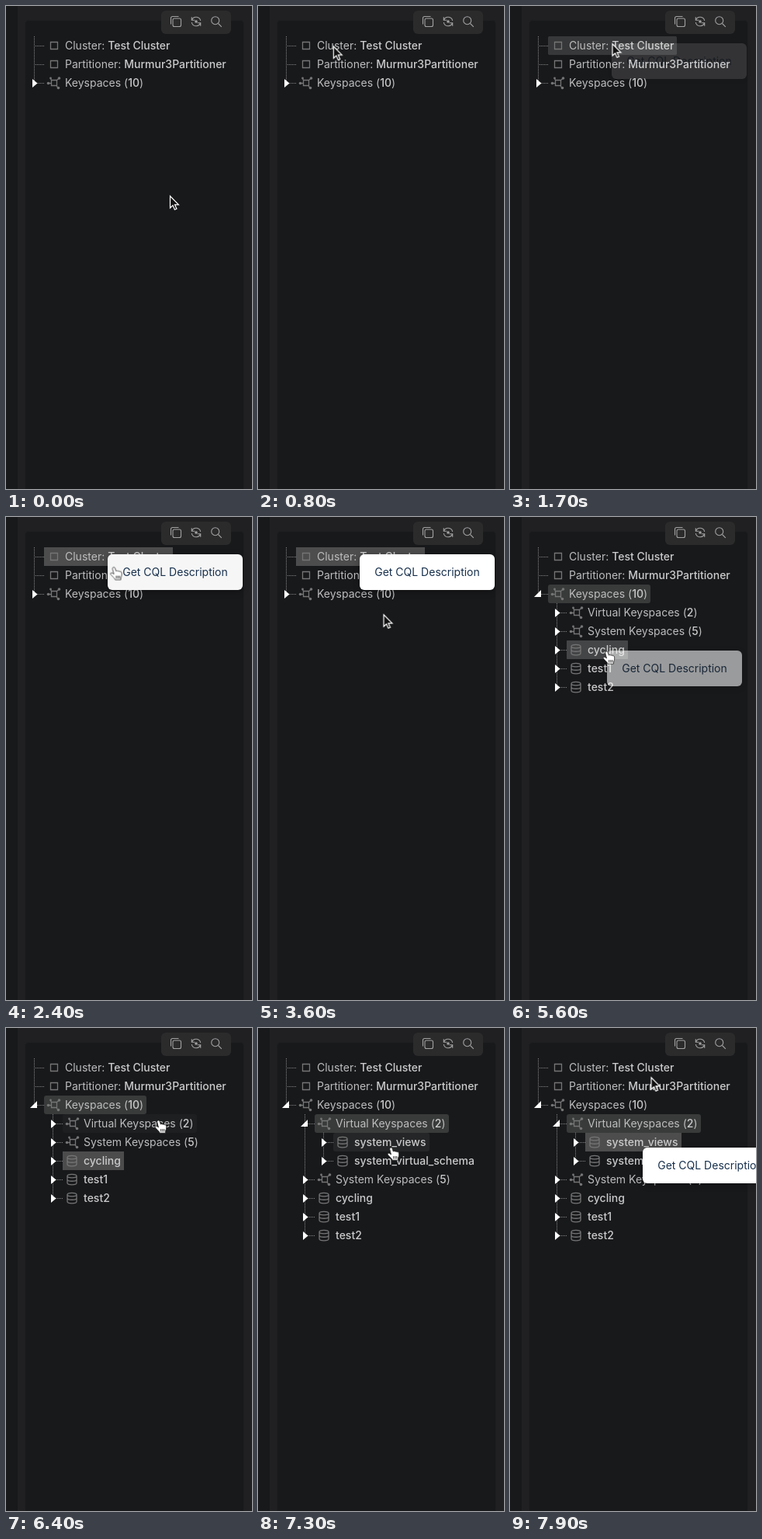
Write an HTML page that moves like this. It is 317 px wide and 622 px high and loops after 8 s.

```html
<!DOCTYPE html>
<html lang="en">
<head>
<meta charset="utf-8">
<title>Keyspace tree</title>
<style>
  :root { --hover: #252627; --picked: #393a3a; --menu: #4d4d4e; }
  * { box-sizing: border-box; }
  html, body { margin: 0; width: 100%; height: 100%; overflow: hidden; background: #202022; }
  body { position: relative; font: 14px/24px Inter, sans-serif; color: #bdbdbe; }
  svg { position: absolute; overflow: visible; fill: none; }
  b { font-weight: 500; color: #cbcbcc; }

  .rail { position: absolute; left: 0; top: 0; width: 15px; height: 100%; background: #18191b; }
  .panel { position: absolute; left: 24px; top: 18px; width: 283px; height: 640px; background: #18191b; border: 1px solid #1e1f21; border-radius: 5px; }
  .tools { position: absolute; left: 200px; top: 6px; width: 90px; height: 30px; background: #2b2b2c; border-radius: 6px; }
  .tools svg { top: 6px; width: 16px; height: 16px; stroke: #a2a2a3; stroke-width: 1.1; }

  /* tree */
  ul { list-style: none; margin: 0; padding: 0; }
  .tree { position: absolute; left: 25px; top: 39px; white-space: nowrap; }
  li { position: relative; padding-left: 24px; }
  li::before, li::after { content: ""; position: absolute; }
  li::before { left: 11px; top: 0; width: 1px; height: 100%; background: repeating-linear-gradient(#858586 0 1px, transparent 1px 2px); }
  li:last-child::before { height: 13px; }
  li::after { left: 12px; top: 12px; width: 12px; height: 1px; background: repeating-linear-gradient(90deg, transparent 0 1px, #858586 1px 2px); }
  .row { position: relative; display: block; width: max-content; height: 24px; padding: 0 4px 0 27px; border-radius: 3px; }
  .row svg { left: 0; top: 0; width: 24px; height: 24px; stroke: #757576; stroke-width: 1.3; }
  .arrow { position: absolute; z-index: 1; left: 6px; top: 5px; width: 12px; height: 14px; background: #fff; clip-path: polygon(3px 2px, 9.5px 7.5px, 3px 13px); }
  .kids { height: 0; overflow: hidden; }

  .popup { position: absolute; left: 131px; top: 48px; width: 174px; height: 46px; border-radius: 6px; background: #fff; color: #17304d; line-height: 46px; text-align: center; white-space: nowrap; box-shadow: 0 2px 8px rgba(0, 0, 0, .3); opacity: 0; }
  .cursor { position: absolute; left: 0; top: 0; width: 0; height: 0; }

  /* motion */
  .anim { animation: 8s linear infinite; }
  .root-kids { animation-name: rootKids; }
  .sub-kids { animation-name: subKids; }
  .root-arrow { animation-name: rootArrow; animation-timing-function: step-end; }
  .sub-arrow { animation-name: subArrow; animation-timing-function: step-end; }
  .cluster { animation-name: cluster; }
  .spaces { animation-name: spaces; }
  .virtual { animation-name: virtual; }
  .cycling { animation-name: cycling; }
  .views { animation-name: views; }
  .popup { animation: fade 8s linear infinite, place 8s step-end infinite, tint 8s linear infinite; }
  .cursor { animation: move 8s ease-in-out infinite; }
  .pointer { animation: pointer 8s step-end infinite; }
  .hand { animation: hand 8s step-end infinite; }

  @keyframes rootKids { 0%, 53.125% { height: 0; } 55.625% { height: 120px; } 55.7%, 100% { height: 168px; } }
  @keyframes subKids { 0%, 81.25% { height: 0; } 83.75%, 100% { height: 48px; } }
  @keyframes rootArrow { 53.125%, 100% { clip-path: polygon(0 11px, 9px 11px, 9px 2px); } }
  @keyframes subArrow { 81.25%, 100% { clip-path: polygon(0 11px, 9px 11px, 9px 2px); } }

  @keyframes cluster {
    0%, 10% { background: #25262700; }
    12%, 20.25% { background: var(--hover); border-radius: 3px; }
    22.5%, 47.5% { background: var(--menu); border-radius: 0; }
    50%, 100% { background: #25262700; }
  }
  @keyframes spaces {
    0%, 50% { background: #25262700; }
    52%, 53.125% { background: var(--hover); }
    55%, 81.25% { background: var(--picked); }
    83.5%, 100% { background: #25262700; }
  }
  @keyframes virtual {
    0%, 59% { background: #25262700; }
    61.5% { background: var(--hover); }
    64%, 79% { background: #25262700; }
    81.25% { background: var(--hover); }
    83.5%, 100% { background: var(--picked); }
  }
  @keyframes cycling {
    0%, 63.75% { background: #25262700; }
    66%, 68.25% { background: var(--hover); border-radius: 3px; }
    70.5%, 80% { background: var(--menu); border-radius: 0; }
    82.5%, 100% { background: #25262700; }
  }
  @keyframes views {
    0%, 88.5% { background: #25262700; }
    90.5%, 91.5% { background: var(--hover); border-radius: 3px; }
    94%, 100% { background: var(--menu); border-radius: 0; }
  }

  @keyframes fade {
    0%, 20.9% { opacity: 0; }
    21.25% { opacity: .11; }
    23.75%, 46.5% { opacity: 1; }
    48.75%, 68.4% { opacity: 0; }
    71.25%, 77.5% { opacity: 1; }
    79.9%, 92% { opacity: 0; }
    95%, 100% { opacity: 1; }
  }
  @keyframes place {
    0% { left: 131px; top: 48px; }
    60% { left: 125px; top: 172px; }
    85%, 100% { left: 171px; top: 154px; }
  }
  @keyframes tint {
    0%, 29% { background: #fff; }
    31%, 43.8% { background: #eee; }
    44.9%, 100% { background: #fff; }
  }

  @keyframes move {
    0%, 1.25% { transform: translate(211px, 244px); animation-timing-function: ease-in; }
    5% { transform: translate(160px, 150px); animation-timing-function: ease-out; }
    8.125% { transform: translate(57px, 62px); }
    11.25%, 13.1% { transform: translate(116px, 46px); }
    15%, 25.6% { transform: translate(131.5px, 48px); }
    28% { transform: translate(115px, 58px); }
    31.25%, 43.75% { transform: translate(150px, 66px); }
    45%, 47.5% { transform: translate(161.5px, 125px); }
    51.25%, 56.25% { transform: translate(113px, 97px); animation-timing-function: linear; }
    60% { transform: translate(131px, 127px); animation-timing-function: ease-out; }
    65%, 71.25% { transform: translate(125px, 172px); }
    77.5% { transform: translate(195px, 121px); }
    80%, 83.75% { transform: translate(197px, 118px); }
    90%, 93.4% { transform: translate(172px, 153px); }
    98.75%, 100% { transform: translate(181.5px, 63px); }
  }
  @keyframes pointer {
    0% { opacity: 1; }
    30% { opacity: 0; }
    44.5% { opacity: 1; }
    50.5% { opacity: 0; }
    94.5%, 100% { opacity: 1; }
  }
  @keyframes hand {
    0% { opacity: 0; }
    30% { opacity: 1; }
    44.5% { opacity: 0; }
    50.5% { opacity: 1; }
    94.5%, 100% { opacity: 0; }
  }
</style>
</head>
<body>
<svg width="0" height="0">
  <defs>
    <path id="box" d="M8.5 7.5h9v9h-9z"/>
    <g id="node">
      <path d="M9.500 8.500h7v7h-7zM9.500 12.500H5M16.500 8.500l3-2.500M16 15.500l2 3M9.500 8.500l-1-2"/>
      <g fill="#757576" stroke="none">
        <circle cx="5.500" cy="12.500" r="1.800"/><circle cx="19.500" cy="6" r="1.800"/>
        <circle cx="18.500" cy="18.500" r="1.800"/><circle cx="8.500" cy="6" r="1.400"/>
      </g>
    </g>
    <path id="db" d="M6 7.6c0-3 12-3 12 0s-12 3-12 0v9c0 3 12 3 12 0v-9M6 12c0 3 12 3 12 0"/>
  </defs>
</svg>

<div class="rail"></div>
<div class="panel"></div>
<div class="tools">
  <svg style="left:11px"><rect x="4" y="4" width="10.500" height="10.500" rx="2"/><path d="M1.500 11.500V3.500a2 2 0 0 1 2-2h8"/></svg>
  <svg style="left:37px">
    <path d="M2.500 6.200A5.800 5.800 0 0 1 13.700 7M13.500 9.800A5.800 5.800 0 0 1 2.300 9M2.300 2.300v4h4M13.700 13.700v-4h-4"/>
    <circle cx="8" cy="8" r="1.800" fill="#a2a2a3" stroke="none"/>
  </svg>
  <svg style="left:63px"><circle cx="6.700" cy="6.700" r="5"/><path d="M10.500 10.500l4.300 4.300"/></svg>
</div>

<ul class="tree">
  <li><span class="row anim cluster"><svg><use href="#box"/></svg>Cluster: <b>Test Cluster</b></span></li>
  <li><span class="row"><svg><use href="#box"/></svg>Partitioner: <b>Murmur3Partitioner</b></span></li>
  <li>
    <i class="arrow anim root-arrow"></i>
    <span class="row anim spaces"><svg><use href="#node"/></svg>Keyspaces (<b>10</b>)</span>
    <ul class="kids anim root-kids">
      <li>
        <i class="arrow anim sub-arrow"></i>
        <span class="row anim virtual"><svg><use href="#node"/></svg>Virtual Keyspaces (<b>2</b>)</span>
        <ul class="kids anim sub-kids">
          <li><i class="arrow"></i><span class="row anim views"><svg><use href="#db"/></svg><b>system_views</b></span></li>
          <li><i class="arrow"></i><span class="row"><svg><use href="#db"/></svg><b>system_virtual_schema</b></span></li>
        </ul>
      </li>
      <li><i class="arrow"></i><span class="row"><svg><use href="#node"/></svg>System Keyspaces (<b>5</b>)</span></li>
      <li><i class="arrow"></i><span class="row anim cycling"><svg><use href="#db"/></svg><b>cycling</b></span></li>
      <li><i class="arrow"></i><span class="row"><svg><use href="#db"/></svg><b>test1</b></span></li>
      <li><i class="arrow"></i><span class="row"><svg><use href="#db"/></svg><b>test2</b></span></li>
    </ul>
  </li>
</ul>

<div class="popup">Get CQL Description</div>

<div class="cursor">
  <svg class="pointer" width="14" height="20"><path d="M.5 .8V16l3.500-3.300 2.400 5.600 2.500-1.100-2.400-5.400h4.900z" fill="#111" stroke="#fff" stroke-width="1.200"/></svg>
  <svg class="hand" width="18" height="19" style="left:-6px;top:0">
    <path d="M4.300 1.500c1-1 2.300-.4 2.700.6l1.300 4c.7-.9 2-.7 2.500.2.800-.7 1.900-.4 2.300.5 1-.5 2.200 0 2.400 1.200.4 2.500.2 4-.8 6l-.3 3.200h-7.200c-.6-2-2.400-3.200-4-5-.9-1-1.900-1.700-2-2.700 0-1.300 1.600-1.500 2.600-.8l1.700 1.200-1.700-6.500c-.2-.7 0-1.400.5-1.900z" fill="#fff" stroke="#222" stroke-width=".8"/>
    <path d="M8.700 12v3.500M10.800 12v3.500M12.800 12v3.500" stroke="#222" stroke-width=".9"/>
  </svg>
</div>
</body>
</html>
```
